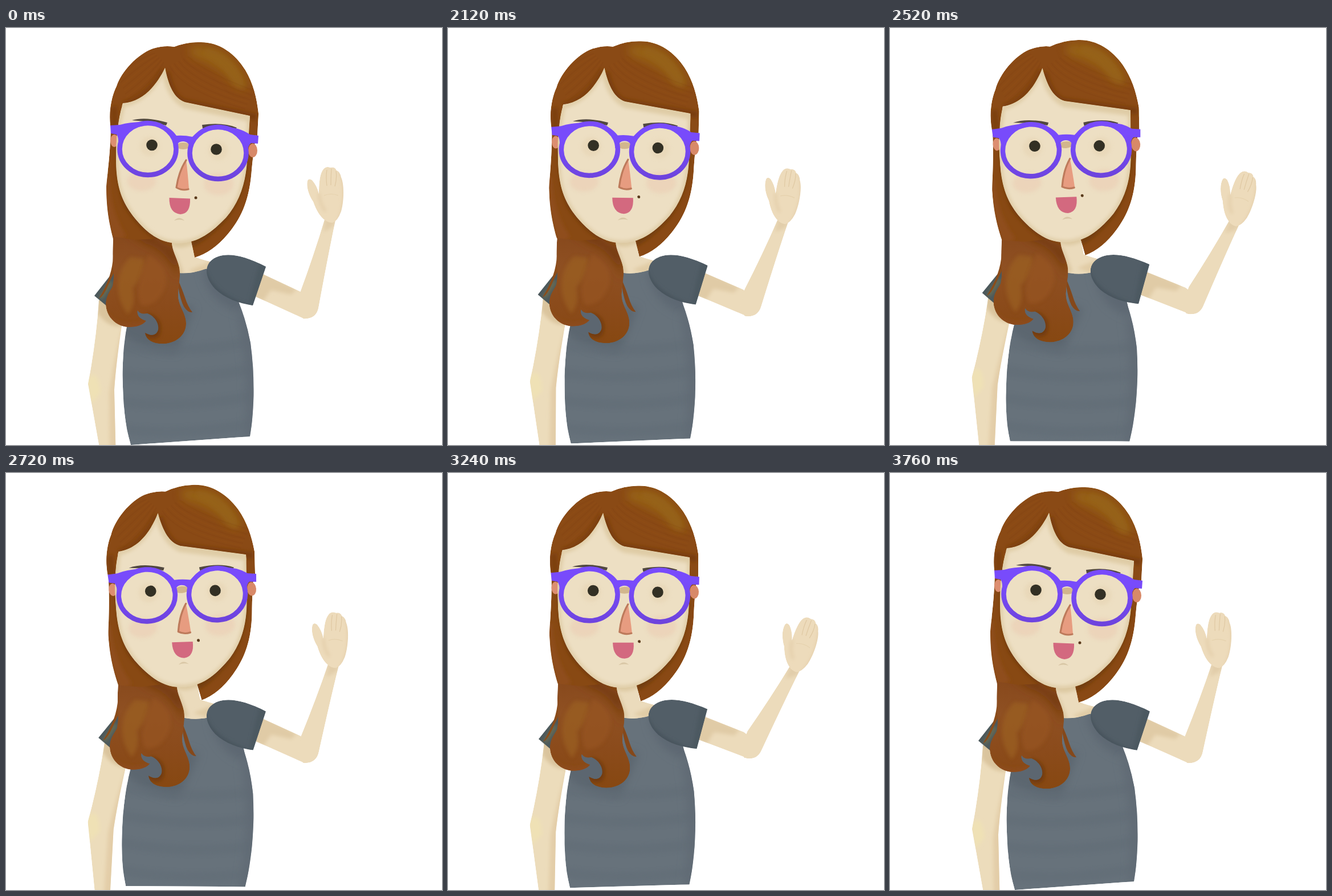
These frames come from a looping animation (765 by 732 pixels, 3.8 s). An HTML page:

```html
<!DOCTYPE html>
<html lang="en">
<head>
<meta charset="utf-8">
<title>Waving woman</title>
<style>
html, body { margin: 0; width: 100%; height: 100%; overflow: hidden; background: #fff; }
svg { display: block; width: 765px; height: 732px; }
.soft { filter: url(#soft); }
.wide { filter: url(#wide); }
</style>
</head>
<body>
<svg viewBox="0 0 765 732">
<defs>
  <filter id="soft" x="-50%" y="-50%" width="200%" height="200%"><feGaussianBlur stdDeviation="3"/></filter>
  <filter id="wide" x="-50%" y="-50%" width="200%" height="200%"><feGaussianBlur stdDeviation="8"/></filter>
  <linearGradient id="frame" gradientUnits="userSpaceOnUse" x1="0" y1="165" x2="0" y2="268">
    <stop offset=".3" stop-color="#784bfb"/><stop offset="1" stop-color="#6d43dc"/>
  </linearGradient>
  <linearGradient id="lock" gradientUnits="userSpaceOnUse" x1="0" y1="340" x2="0" y2="550">
    <stop offset="0" stop-color="#84461a"/><stop offset=".4" stop-color="#8f5022"/>
    <stop offset=".7" stop-color="#8b4b1b"/><stop offset="1" stop-color="#874812"/>
  </linearGradient>

  <path id="torso" d="M303 430 C275 428 235 432 216 450 L212 525 C203 570 203 625 208 676 Q211 705 219 732 L428 717 C436 672 437 610 429 553 Q422 515 409 483 L390 425 L350 423 Q325 432 303 430Z"/>
  <path id="leftArm" d="M163 478 Q158 550 144 625 L168 760 H193 L190 635 Q193 590 203 524 L200 470Z"/>
  <path id="neck" d="M290 365 L293 450 H366 V412 Q345 407 332 402 L325 365Z"/>
  <path id="backHair" d="M443 150 C441 180 434 215 431 250 C427 305 411 336 389 362 Q362 394 331 403 L322 360 L400 150Z"/>
  <path id="lowHair" d="M180 315 Q183 346 188 372 C187 390 187 405 188 420 Q190 436 187 453 C182 463 175 470 175 485 C176 508 194 524 215 525 Q237 525 246 514 C235 511 229 504 231 496 Q236 504 248 501 C262 506 269 520 267 530 C263 542 252 540 244 535 C246 550 262 556 281 554 C303 551 316 536 316 519 C316 500 302 488 302 469 C303 448 307 436 304 420 C299 400 290 390 291 372 L280 330Z"/>
  <path id="sideHair" d="M190 115 C182 138 181 155 184 172 C183 220 179 245 176 278 C176 317 181 342 187 366 L225 372 L270 370 L235 330 L212 150Z"/>
  <path id="face" d="M279 62 L205 132 C195 165 193 195 193 230 C193 278 203 305 226 334 C251 364 273 378 304 378 C338 377 362 358 386 333 C409 306 420 275 423 235 L428 154 L312 120Z"/>
  <path id="topHair" d="M183 171 C180 140 187 116 194 102 C203 75 232 45 258 36 Q278 30 295 33 Q318 24 342 25 C375 25 402 45 420 74 C434 98 440 122 443 150 L441 190 L428 182 L428 154 L314 130 C295 123 286 103 279 70 C262 104 239 129 205 132 Q198 152 196 178Z"/>
  <path id="sleeve" d="M456 419 L433 487 C408 483 385 475 367 458 C351 441 347 421 359 409 C376 393 409 394 456 419Z"/>
  <path id="upperArm" d="M440 427 L517 463 L547 488 Q544 511 522 510 L430 468Z"/>
  <path id="forearm" d="M516 464 Q539 402 560 333 L579 333 Q565 400 548.5 490 Q545 511 522 510.5 L512 500Z"/>
  <path id="hand" d="M559 337 Q547 328 539 305 C529 290 527 276 529 268 Q531 263 537 267 Q546 277 549 291 C549 270 551 256 556 249 Q561 242 569 245 Q577 243 580 250 Q586 252 588 262 C594 275 593 305 588 322 Q582 339 573 342 Q565 342 559 337Z"/>
</defs>

<g id="neckPart">
  <g data-shape="neck" data-fill="#ebdbbc">
    <path class="soft" d="M285 360 H330 V379 Q305 391 290 382Z" fill="#ddc9a2"/>
    <path class="soft" d="M288 380 L302 435 L312 431 L298 395Z" fill="#dcc8a2"/>
    <path class="soft" d="M320 426 L365 407 V442Z" fill="#e1cca6"/>
  </g>
</g>

<g id="body">
  <g data-shape="leftArm" data-fill="#ecdcbb">
    <path class="soft" d="M205 520 Q188 590 181 642 L182 760 H205Z" fill="#e3cda8"/>
    <path class="soft" d="M160 470 H208 V522 Q182 530 160 500Z" fill="#dac49d"/>
    <path class="soft" d="M140 620 Q160 590 166 640 L150 660Z" fill="#efe1b5"/>
  </g>
  <g data-shape="torso" data-fill="#67727b">
    <path class="wide" d="M190 470 L330 490 L300 570 Q240 570 190 530Z" fill="#5c6670"/>
    <path class="wide" d="M350 415 L440 470 L420 500 Q360 490 345 430Z" fill="#5d6872"/>
    <g id="bands" class="soft" fill="none" stroke="#626d77" stroke-width="17" opacity=".5"></g>
    <path class="wide" d="M440 500 L442 730 L418 735 Q431 610 405 500Z" fill="#606b74"/>
  </g>
</g>

<g id="rearHead">
  <g data-shape="backHair" data-fill="#894914">
    <path class="soft" d="M424 235 Q418 300 384 340 Q350 375 325 385 L325 360 L400 230Z" fill="#723c0d"/>
  </g>
</g>

<g id="hairTail">
  <path d="M188 428 L155 470 L178 489 L206 470 V430Z" fill="#4b585c"/>
  <path d="M185 446 L166 475" stroke="#707050" stroke-width="6" class="soft"/>
  <path d="M188 400 Q187 436 163 475 Q171 471 179 452 Q186 436 192 425Z" fill="#8b4c1a"/>
  <path d="M300 438 Q309 458 314 473 Q319 489 327 499 Q319 500 312 489 Q306 478 302 453Z" fill="#85481a"/>
  <g data-shape="lowHair" data-fill="url(#lock)">
    <path class="wide" d="M205 310 L275 378 L302 390 L302 440 Q285 390 245 378 Q200 350 190 320Z" fill="#743b0d"/>
    <path class="soft" d="M218 402 C190 430 190 472 214 503 Q229 485 222 456 Q245 432 242 405Z" fill="#9a5f21" opacity=".75"/>
    <path class="soft" d="M250 398 Q289 420 279 455 Q266 489 238 487 Q222 463 250 398Z" fill="#965420" opacity=".75"/>
    <path class="soft" d="M245 500 Q278 507 270 538 Q262 551 242 540 V528 Q266 538 262 520Z" fill="#713a0c"/>
    <path class="soft" d="M178 500 Q197 528 248 514 V530 H180Z" fill="#8d4c1c"/>
  </g>
</g>

<g id="head">
  <g data-shape="sideHair" data-fill="#884913">
    <path class="soft" d="M196 180 Q188 270 208 314 Q233 354 268 375 L290 340 L210 180Z" fill="#733b0d"/>
    <path class="soft" d="M181 260 Q182 322 211 365 L191 375 Q173 330 175 260Z" fill="#8f4e1f"/>
  </g>
  <ellipse cx="190" cy="198" rx="7" ry="11" fill="#dc8e70"/>
  <ellipse cx="433" cy="215" rx="8" ry="12" fill="#d88968"/>
  <g data-shape="face" data-fill="#eddfc3">
    <path class="soft" d="M279 66 C284 105 296 124 314 134 L430 158" fill="none" stroke="#dfcca6" stroke-width="14"/>
    <path class="soft" d="M279 67 Q253 126 205 135 Q193 180 193 235 C193 278 203 305 226 334 C251 364 273 378 304 378 C338 377 362 358 386 333 C409 306 420 275 423 235 L428 154" fill="none" stroke="#dfcca6" stroke-width="8"/>
    <ellipse class="soft" cx="238" cy="269" rx="25" ry="17" fill="#ebcdb4" opacity=".6"/>
    <ellipse class="soft" cx="373" cy="274" rx="26" ry="19" fill="#ebcdb4" opacity=".6"/>
  </g>
  <g data-shape="topHair" data-fill="#8a4a15">
    <path class="soft" d="M205 134 Q243 128 277 74" fill="none" stroke="#7d4011" stroke-width="11"/>
    <path class="soft" d="M281 78 Q292 126 314 131 L440 157" fill="none" stroke="#793d0f" stroke-width="12"/>
    <path class="wide" d="M322 32 C371 23 413 55 426 104 Q410 114 395 94 Q374 68 324 50Z" fill="#996615" opacity=".85"/>
    <path class="soft" d="M352 35 C384 40 408 66 419 104 Q403 110 392 88 Q376 60 346 48Z" fill="#96641a" opacity=".55"/>
    <g id="strands" fill="none" stroke-width="2"></g>
    <path class="soft" d="M183 140 L195 135 L199 179 H184Z" fill="#7d410f"/>
  </g>

  <path d="M221 162 Q245 155 283 166 L281 171 Q252 164 221 162Z" fill="#514840"/>
  <path d="M344 170 Q381 165 405 175 L402 178 Q372 172 345 176Z" fill="#514840"/>
  <ellipse cx="311" cy="207" rx="12" ry="6" fill="#d2b68d"/>
  <circle class="soft" cx="252" cy="208" r="17" fill="#e5d2b0" opacity=".5"/>
  <circle class="soft" cx="372" cy="215" r="17" fill="#e5d2b0" opacity=".5"/>
  <g fill="#333024"><circle cx="256" cy="205.5" r="9.8"/><circle cx="369" cy="213" r="9.8"/></g>

  <g fill="none" stroke="url(#frame)" stroke-width="8.5">
    <ellipse cx="249" cy="212.5" rx="49.5" ry="45.5"/>
    <ellipse cx="372" cy="219.5" rx="49.5" ry="45.5"/>
  </g>
  <g fill="url(#frame)">
    <path d="M183 171 L200 170 Q216 165 242 165 V172 Q214 174 204 202 L197 207 Q198 191 194 187 L184 185Z"/>
    <path d="M443 189 L428 187 Q410 174 380 173 V179 Q411 182 418 214 L424 218 Q425 205 430 202 L442 203Z"/>
    <path d="M267 168 Q288 173 299 189 Q313 188 327 191 Q337 180 356 175 Q336 185 326 211 L322 213 Q323 200 311 199 Q300 199 299 210 L294 211 Q294 183 267 168Z"/>
  </g>

  <path d="M316 231 Q302 252 298 280 Q309 288 321 283 Q319 255 316 231Z" fill="#e79c80"/>
  <path d="M316 232 Q303 252 299 280 Q309 286 320 283" fill="none" stroke="#bd7a5b" stroke-width="3.2" stroke-linecap="round" stroke-linejoin="round"/>
  <path d="M286.5 298 L323 299.5 Q324 326 306 327 Q286 325 286.5 298Z" fill="#d3697f"/>
  <circle cx="333" cy="298" r="2.5" fill="#593a1b"/>
  <path d="M295 338 Q304 329 313 338 Q304 335 295 338Z" fill="#d9c7a6"/>
</g>

<g id="arm">
  <g data-shape="upperArm" data-fill="#ecdbbb">
    <path class="soft" d="M435 420 L510 459 L500 468 L465 460 L451 480 L430 470Z" fill="#e0cba6"/>
  </g>
  <g id="fore">
    <g data-shape="forearm" data-fill="#ecdbbb">
      <path class="soft" d="M560 325 H582 L575 348 L557 358Z" fill="#e2ceaa"/>
    </g>
    <g id="palm">
      <g data-shape="hand" data-fill="#eddbbb">
        <path class="soft" d="M585 250 Q601 300 580 343 L600 343V250Z" fill="#e3cca7"/>
        <path class="soft" d="M549 290 Q551 311 561 322" fill="none" stroke="#dfc8a2" stroke-width="3"/>
      </g>
      <path d="M563 249 Q561 262 563 277 M571 247 Q570 262 570 276 M579 251 Q581 264 577 278" fill="none" stroke="#dfc8a2" stroke-width="1.2"/>
      <path d="M558 294 Q570 289 583 294" fill="none" stroke="#e5d1ad" stroke-width="1.2"/>
    </g>
  </g>
  <g data-shape="sleeve" data-fill="#525e67">
    <path class="soft" d="M350 420 Q360 466 433 488 L430 497 Q350 480 342 420Z" fill="#47535c"/>
    <path class="soft" d="M445 410 L462 418 L437 492 L425 487Z" fill="#4c5861"/>
  </g>
</g>
</svg>
<script>
const NS = "http://www.w3.org/2000/svg";
const byId = id => document.getElementById(id);
const make = (tag, attrs, parent) => {
  const el = document.createElementNS(NS, tag);
  for (const key in attrs) el.setAttribute(key, attrs[key]);
  parent.append(el);
  return el;
};

// Each shaded shape is a flat fill with its soft shadows clipped inside.
const defs = document.querySelector("defs");
for (const group of document.querySelectorAll("[data-shape]")) {
  const { shape, fill } = group.dataset;
  const clip = make("clipPath", { id: shape + "Clip" }, defs);
  make("use", { href: "#" + shape }, clip);
  group.setAttribute("clip-path", `url(#${shape}Clip)`);
  group.prepend(make("use", { href: "#" + shape, fill }, group));
}

for (let y = 555; y < 720; y += 48)
  make("path", { d: `M195 ${y + 5} Q320 ${y + 19} 442 ${y - 7}` }, byId("bands"));

for (let i = 0; i < 9; i++) {
  const tone = { stroke: i % 2 ? "#a05a18" : "#6d350c", opacity: 0.09 };
  make("path", { ...tone, d: `M${277 - i * 2} ${60 - i * 2} Q${255 - i * 4} ${98 - i * 5} ${213 - i * 2} ${126 - i * 5}` }, byId("strands"));
  make("path", { ...tone, d: `M${287 + i * 4} ${66 - i * 2} Q${310 + i * 5} ${111 - i * 4} ${420 + i * 2} ${142 - i * 4}` }, byId("strands"));
}

// Smooth curve through [time, value] steps, flat at every turning point.
function curve(steps) {
  const n = steps.length;
  const rate = i => (steps[i + 1][1] - steps[i][1]) / (steps[i + 1][0] - steps[i][0]);
  const slopes = steps.map((_, i) => {
    if (i === 0 || i === n - 1) return 0;
    const a = rate(i - 1), b = rate(i);
    return a * b <= 0 ? 0 : 2 * a * b / (a + b);
  });
  return t => {
    if (t <= steps[0][0]) return steps[0][1];
    const i = steps.findIndex(s => s[0] >= t) - 1;
    if (i < 0) return steps[n - 1][1];
    const [t0, v0] = steps[i], [t1, v1] = steps[i + 1];
    const h = t1 - t0, u = (t - t0) / h, w = 1 - u;
    return v0 * (1 + 2 * u) * w * w + h * slopes[i] * u * w * w
      + v1 * (3 - 2 * u) * u * u - h * slopes[i + 1] * u * u * w;
  };
}

const LOOP = 3800, STEP = 40;
const sway = curve([[1800, 0], [2120, .4], [2320, .78], [2520, 1], [2720, 1.08],
  [2920, 1], [3240, .6], [3480, .26], [3760, 0]]);
const wave = curve([[1800, 0], [2120, .53], [2320, 1.25], [2400, 1.38], [2520, 1],
  [2800, .02], [2920, .15], [3240, 1.14], [3360, 1.38], [3480, 1.13], [3760, .14], [3800, 0]]);

const pose = (id, ...moves) => byId(id).setAttribute("transform", moves.join(" "));
const turn = (angle, x, y) => `rotate(${angle} ${x} ${y})`;
const shift = (x, y) => `translate(${x} ${y})`;

function draw() {
  const t = Math.floor(performance.now() % LOOP / STEP) * STEP;
  const s = sway(t), w = wave(t);
  const tilt = [shift(-0.5 * s, 1.3 * s), turn(-4 * s, 262, 228)];
  pose("body", shift(0, s), turn(4.1 * s, 319, 613));
  pose("rearHead", ...tilt);
  pose("head", ...tilt);
  pose("neckPart", shift(8 * s, -4.5 * s));
  pose("hairTail", shift(6.5 * s, -3.3 * s), turn(s, 250, 480));
  pose("arm", turn(-3.2 * w, 386, 432));
  pose("fore", turn(16 * w, 526, 487));
  pose("palm", turn(2.5 * w, 569, 340));
  requestAnimationFrame(draw);
}
draw();
</script>
</body>
</html>
```
